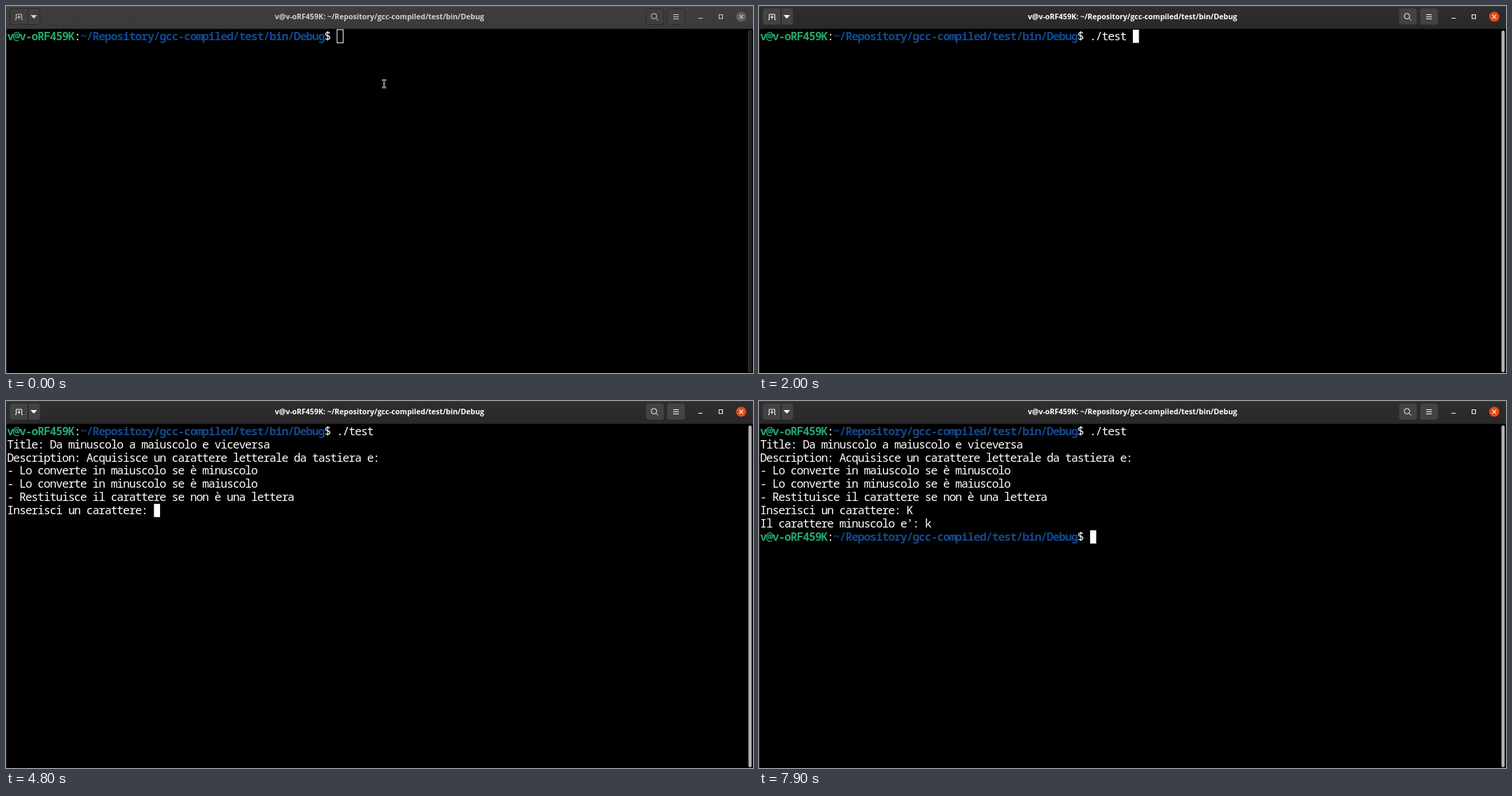
Animation of 1067x525 px, one loop 8000 ms. Source, as an HTML page:

```html
<!DOCTYPE html>
<html lang="it">
<head>
<meta charset="utf-8">
<title>Terminal</title>
<style>
  html, body { margin: 0; width: 100%; height: 100%; overflow: hidden; background: #000; }
  svg { display: block; }
  text { white-space: pre; }
  #screen text { font: 16.4px "Noto Sans Mono", "DejaVu Sans Mono", monospace; letter-spacing: -1.12px; fill: #fff; }
  #screen .user { fill: #26a269; font-weight: 700; }
  #screen .path { fill: #12488b; font-weight: 700; }
  .title { font: 700 10.55px "Open Sans", "Noto Sans", sans-serif; text-anchor: middle; }
</style>
</head>
<body>
<svg width="1067" height="525" viewBox="0 0 1067 525">
  <defs>
    <linearGradient id="active" x2="0" y2="1"><stop stop-color="#2e2e2e"/><stop offset="1" stop-color="#292929"/></linearGradient>
    <linearGradient id="inactive" x2="0" y2="1"><stop stop-color="#3e3e3e"/><stop offset="1" stop-color="#3a3a3a"/></linearGradient>
  </defs>
  <rect width="1067" height="525"/>
  <g id="focused"></g>
  <g id="idle"></g>
  <g id="screen"></g>
  <rect id="caret"/>
  <g id="pointer" fill="none">
    <path d="M537 106h2.200l.9.7.9-.7h2.200M540.100 106.500v9.500M537 116.500h2.200l.9-.7.9.7h2.200" stroke="#d4d4d4" stroke-width="2.200"/>
    <path d="M537.500 106h2l.6.7.6-.7h2M540.100 107v8.500M537.500 116.500h2l.6-.7.6.7h2" stroke="#111" stroke-width=".7"/>
  </g>
</svg>
<script>
const LOOP = 8000, CELL = 8.72, LINE = 18.89, LEFT = 2.05, TOP = 33.85;
const TEXT_LEFT = LEFT - .56, BASELINE = TOP + 14.9;
const HOST = 'v@v-oRF459K', PATH = '~/Repository/gcc-compiled/test/bin/Debug';
const PROMPT_LENGTH = (HOST + ':' + PATH + '$ ').length;
const OUTPUT = [
  'Title: Da minuscolo a maiuscolo e viceversa',
  'Description: Acquisisce un carattere letterale da tastiera e:',
  '- Lo converte in maiuscolo se è minuscolo',
  '- Lo converte in minuscolo se è maiuscolo',
  '- Restituisce il carattere se non è una lettera'
];
const QUESTION = 'Inserisci un carattere: ';
const $ = id => document.getElementById(id);

// Value of the last [time, value] step that has been reached.
const stepAt = (steps, t) => steps.reduce((value, [start, next]) => t >= start ? next : value, steps[0][1]);

const FOCUS = [[0, 0], [300, .45], [400, .93], [500, .98], [600, 1]];
const COMMAND = [[0, ''], [1400, '.'], [1700, './'], [2000, './test ']];
const CARET_ON = [
  [0, true], [900, false], [1300, true], [3000, false], [3600, true], [4100, false], [4800, true],
  [5400, false], [5600, true], [6300, false], [6700, true], [7100, false], [7900, true]
];

function windowFrame({ bar, edge, button, border, divider, ink, close, thumb }) {
  const box = (x, w) => `<rect x="${x}.5" y="3.5" width="${w}" height="23" rx="3.5" fill="${button}" stroke="${border}"/>`;
  return `
    <path d="M.5 32V525" stroke="${edge}"/>
    <rect width="1067" height="32.5" fill="url(#${bar})"/>
    <path d="M0 .5H1067" stroke="#fff" stroke-opacity=".07"/>
    <path d="M0 32.5H1067" stroke="${divider}"/>
    ${box(5, 43)}${box(914, 25)}${box(944, 25)}
    <path d="M31.5 4V27" stroke="${divider}"/>
    <path d="M35 13h9.4l-4.7 5z" fill="${ink}"/>
    <g fill="none" stroke="${ink}">
      <path d="M13 19.5h1.5v-7.5h8v7.5h1.5M18.5 13.5v5M16 16h5"/>
      <circle cx="925.6" cy="14.6" r="3.9"/>
      <path d="M928.5 17.5l3 3M953 12.5h8M953 15.5h8M953 18.5h8M989 17.5h6"/>
      <rect x="1018.5" y="12.5" width="5" height="5.5"/>
    </g>
    <circle cx="1050.2" cy="15.4" r="7.2" fill="${close}"/>
    <path d="M1047.5 12.7l5.4 5.4m0-5.4l-5.4 5.4" stroke="${ink}" stroke-width="1.1"/>
    <text class="title" x="533.5" y="19" fill="${ink}">${HOST}: ${PATH}</text>
    <rect x="1060.5" y="35" width="4.6" height="489" rx="2.3" fill="${thumb}"/>`;
}

$('focused').innerHTML = windowFrame({
  bar: 'active', edge: '#292929', button: '#434343', border: '#393939', divider: '#1c1c1c',
  ink: '#fff', close: '#e54b18', thumb: '#b2b2b2'
});
$('idle').innerHTML = windowFrame({
  bar: 'inactive', edge: '#353535', button: '#3f3f3f', border: '#2b2b2b', divider: '#2b2b2b',
  ink: '#d2d2d2', close: '#616161', thumb: '#1f1f1f'
});

const prompt = command => `<tspan class="user">${HOST}</tspan>:<tspan class="path">${PATH}</tspan>$ ${command}`;

function terminalState(t) {
  const command = stepAt(COMMAND, t);
  const lines = [prompt(command)];
  let row = 0, column = PROMPT_LENGTH + command.length;
  if (t >= 2500) {
    const answer = t >= 5700 ? 'K' : '';
    lines.push(...OUTPUT, QUESTION + answer);
    row = 6;
    column = QUESTION.length + answer.length;
  }
  if (t >= 6700) {
    lines.push("Il carattere minuscolo e': k", prompt(''));
    row = 8;
    column = PROMPT_LENGTH;
  }
  return { lines, row, column };
}

function setAttributes(node, attributes) {
  for (const name in attributes) node.setAttribute(name, attributes[name]);
}

let shown = '';
function render(t) {
  const { lines, row, column } = terminalState(t);
  const markup = lines.map((line, i) => `<text x="${TEXT_LEFT}" y="${BASELINE + i * LINE}">${line}</text>`).join('');
  if (markup !== shown) $('screen').innerHTML = shown = markup;

  $('idle').setAttribute('opacity', 1 - stepAt(FOCUS, t));
  $('pointer').setAttribute('visibility', t < 1300 ? 'visible' : 'hidden');

  const hollow = t < 300;
  setAttributes($('caret'), {
    x: LEFT + column * CELL,
    y: TOP + row * LINE,
    width: CELL,
    height: LINE,
    fill: hollow ? 'none' : '#fff',
    stroke: hollow ? '#fff' : 'none',
    visibility: stepAt(CARET_ON, t) ? 'visible' : 'hidden'
  });
}

const start = performance.now();
function tick() {
  render((performance.now() - start) % LOOP);
  requestAnimationFrame(tick);
}
tick();
</script>
</body>
</html>
```
